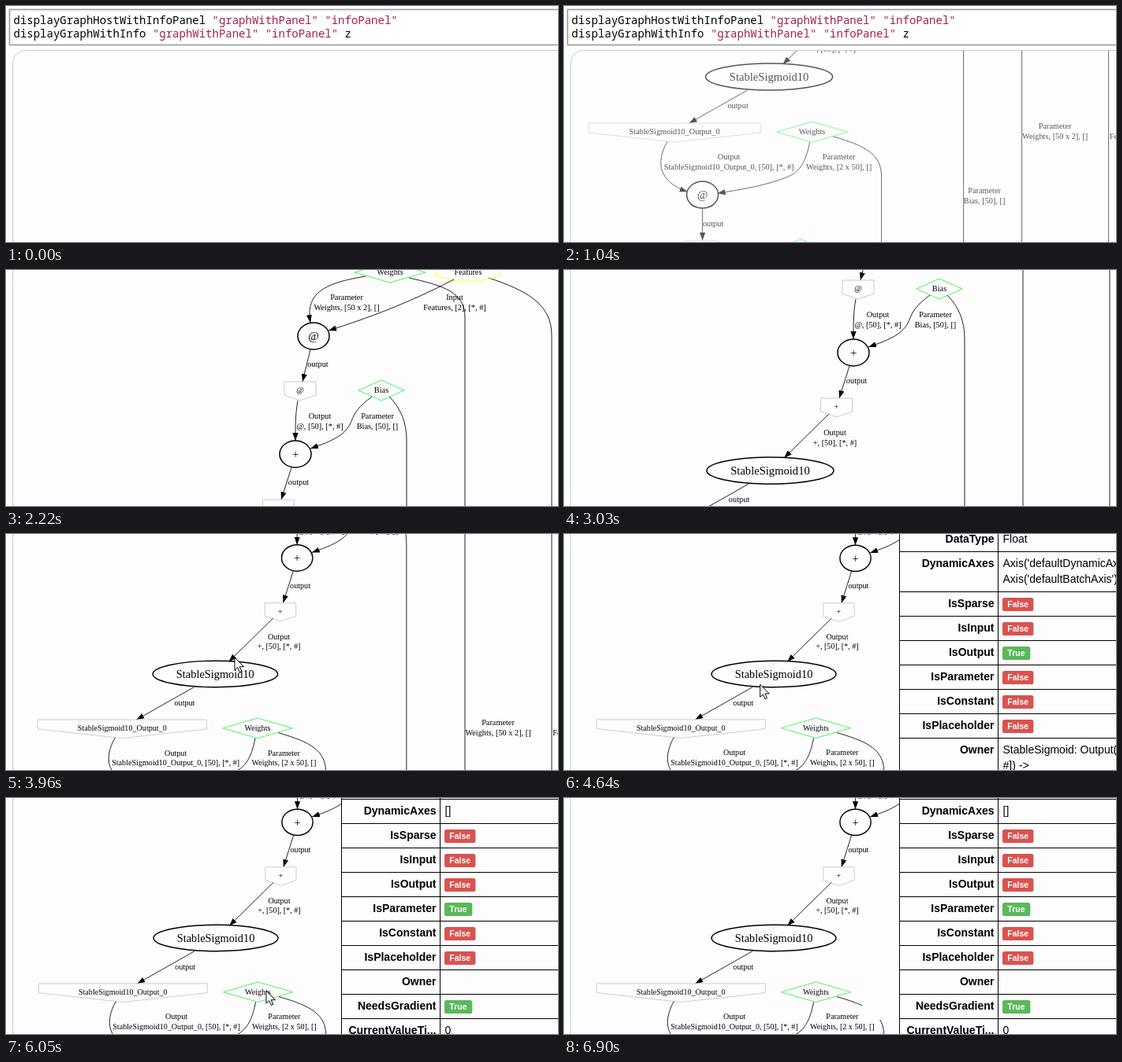
An HTML page for the animation above (7.3 s loop, 700 by 300 pixels).

```html
<!DOCTYPE html>
<html lang="en">
<head>
<meta charset="utf-8">
<title>Graph with info panel</title>
<style>
  html, body { margin: 0; width: 100%; height: 100%; overflow: hidden; background: #fff; }
  svg { display: block; }
  .code { font: 14px "Noto Sans Mono", monospace; }
  .str { fill: #a31f4c; }
  .graph { font: 10.3px "Liberation Serif", serif; text-anchor: middle; }
  .big { font-size: 14.6px; }
  .edge { fill: none; stroke: #222; }
  .arrow { marker-end: url(#head); }
  .op { fill: none; stroke: #000; stroke-width: 1.5; }
  .out { fill: none; stroke: #ccc; }
  .param { fill: none; stroke: #48f55c; }
  .input { fill: none; stroke: #ff3; }
  .table { font: 14px "Liberation Sans", sans-serif; }
  .table path { stroke: #000; fill: none; }
  .key { font-weight: bold; text-anchor: end; }
  .badge { font-weight: bold; font-size: 10.5px; fill: #fff; }
</style>
</head>
<body>
<svg width="700" height="300" viewBox="0 0 700 300">
  <defs>
    <marker id="head" markerUnits="userSpaceOnUse" markerWidth="11" markerHeight="8" refX="10" refY="4" orient="auto">
      <path d="M0,.4 L10,4 L0,7.6Z"/>
    </marker>
    <clipPath id="panelClip"><rect x="9" y="57" width="700" height="1500"/></clipPath>
  </defs>
  <g id="page">
    <rect x="4.5" y="4.5" width="720" height="45" fill="#fff" stroke="#999" stroke-width="1.6"/>
    <text class="code" x="9.5" y="23">displayGraphHostWithInfoPanel <tspan class="str">"graphWithPanel"</tspan> <tspan class="str">"infoPanel"</tspan></text>
    <text class="code" x="9.5" y="40">displayGraphWithInfo <tspan class="str">"graphWithPanel"</tspan> <tspan class="str">"infoPanel"</tspan> z</text>
    <rect x="8.5" y="56.5" width="720" height="1500" rx="16" fill="#fdfdfd" stroke="#a9d8de"/>
    <g clip-path="url(#panelClip)">
      <g id="graph" class="graph"><g id="outer"></g><g id="inner"></g></g>
    </g>
  </g>
  <rect id="gap" x="378" y="260" width="36" height="22" fill="#fdfdfd"/>
  <g id="outputTable" class="table"></g>
  <g id="weightsTable" class="table"></g>
  <path id="cursor" d="M0,0 V16 L3.7,12.6 L6.3,18.5 L8.8,17.4 L6.2,11.7 H11.5Z" fill="#fff" stroke="#000"/>
</svg>
<script>
const LOOP = 7300;
const $ = id => document.getElementById(id);

// Graph pieces, in page coordinates
const text = (x, y, s, cls = '') => `<text class="${cls}" x="${x}" y="${y + (cls ? 4.8 : 3.4)}">${s}</text>`;
const lines = (x, y, a, b) => text(x, y, a) + text(x, y + 12.5, b);
const poly = (cls, pts) => `<polygon class="${cls}" points="${pts}"/>`;
const op = (x, y, s, rx = 20) => `<ellipse class="op" cx="${x}" cy="${y}" rx="${rx}" ry="17"/>` + text(x, y, s, 'big');
const param = (x, y, s, w) => poly('param', [x - w, y, x, y - 13, x + w, y, x, y + 13]) + text(x, y, s);
const out = (x, y, s, w = 20) =>
  poly('out', [x - w, y - 11, x + w, y - 11, x + w, y + (w > 50 ? 1 : 6), x, y + 13, x - w, y + (w > 50 ? 1 : 6)]) + text(x, y, s);
const line = d => `<path class="edge" d="${d}"/>`;
const arrow = d => `<path class="edge arrow" d="${d}"/>`;

$('outer').innerHTML = [
  arrow('M511,79 C555,89 582,97 582,129 V860 C582,920 490,950 395,977'),
  arrow('M612,79 C660,95 692,112 692,152 V870 C692,935 520,965 398,983'),
  lines(624, 516, 'Parameter', 'Weights, [50 x 2], []'),
  lines(733, 516, 'Input', 'Features, [2], [*, #]'),
].join('');

$('inner').innerHTML = [
  param(487, 72, 'Weights', 45),
  poly('input', [546, 66, 571, 59, 601, 59, 626, 66, 626, 77, 601, 83, 571, 83, 546, 77]),
  text(586, 72, 'Features'),
  arrow('M456,77 C400,86 380,100 386,136'),
  arrow('M568,81 C515,109 460,130 409,146'),
  lines(432, 104, 'Parameter', 'Weights, [50 x 2], []'),
  lines(569, 104, 'Input', 'Features, [2], [*, #]'),
  op(390, 153, '@'),
  arrow('M386,170 L376,211'),
  text(395.5, 189, 'output'),
  out(373, 222, '@'),
  param(476, 222, 'Bias', 29),
  arrow('M370,235 C367,252 367,265 367,286'),
  arrow('M464,230 C430,255 446,262 424,279 C412,287 400,291 386,296'),
  arrow('M486,230 C500,244 508,262 508,285 V860 C508,920 440,950 385,974'),
  lines(398, 255, 'Output', '@, [50], [*, #]'),
  lines(471, 255, 'Parameter', 'Bias, [50], []'),
  op(367, 303, '+'),
  arrow('M362,320 L349,361'),
  text(371, 339, 'output'),
  out(345.5, 372, '+'),
  arrow('M336,381 L279,437'),
  lines(343.5, 405, 'Output', '+, [50], [*, #]'),
  op(261.5, 453, 'StableSigmoid10', 80.5),
  arrow('M234,470 L160,512'),
  text(222, 490, 'output'),
  out(141.5, 523, 'StableSigmoid10_Output_0', 109),
  param(316, 523, 'Weights', 45),
  arrow('M132.5,535 C117,562 122,587 158,599'),
  arrow('M313,536 C308,562 300,574 285,580 C265,589 230,596 196,601'),
  arrow('M343,529 C385,541 404,552 404,580 V880 C404,920 375,950 355,969'),
  lines(210.5, 555, 'Output', 'StableSigmoid10_Output_0, [50], [*, #]'),
  lines(350, 555, 'Parameter', 'Weights, [2 x 50], []'),
  lines(534.5, 598, 'Parameter', 'Bias, [50], []'),
  op(177, 603, '@'),
  arrow('M177,620 V661'),
  text(190.5, 640, 'output'),
  out(177, 672, '@'),
  param(301.5, 672, 'Bias', 29),
  arrow('M175,685 L165,736'),
  arrow('M288,680 C265,705 230,730 182,746'),
  lines(190, 705, 'Output', '@, [2], [*, #]'),
  lines(275, 705, 'Parameter', 'Bias, [2], []'),
  op(163, 753, '+'),
  arrow('M160,770 L152,811'),
  text(173, 789, 'output'),
  out(150, 822, '+'),
  arrow('M152,835 C160,890 220,940 290,972'),
  lines(190, 870, 'Output', '+, [2], [*, #]'),
  op(330, 985, 'Composite', 70),
  arrow('M285,998 L160,1049'),
  out(118, 1060, 'Composite_Output_0', 109),
].join('');

// Info tables: each row is a label and one or more value lines
function table(top, rows) {
  let y = top, body = '', rules = `M425,${y}H700`;
  for (const [key, ...values] of rows) {
    body += `<text class="key" x="545.5" y="${y + 19.5}">${key}</text>`;
    values.forEach((value, i) => {
      if (value === 'True' || value === 'False') {
        const on = value === 'True';
        body += `<rect x="556" y="${y + 7.5}" width="${on ? 35.3 : 39.4}" height="17" rx="2.6" fill="${on ? '#5cb85c' : '#d9534f'}"/>
          <text class="badge" x="562.3" y="${y + 19.8}">${value}</text>`;
      } else {
        body += `<text x="556.5" y="${y + 19.5 + i * 20}">${value}</text>`;
      }
    });
    y += 11 + 20 * values.length;
    rules += `M425,${y}H700`;
  }
  return `<rect x="425" width="275" height="300" fill="#fdfdfd"/>${body}<path d="${rules}M425.5,0V300M550.5,0V300"/>`;
}
const flags = (...on) => ['IsSparse', 'IsInput', 'IsOutput', 'IsParameter', 'IsConstant', 'IsPlaceholder']
  .map(name => [name, on.includes(name) ? 'True' : 'False']);

$('outputTable').innerHTML = table(-8.5, [
  ['DataType', 'Float'],
  ['DynamicAxes', "Axis('defaultDynamicAxis'),", "Axis('defaultBatchAxis')"],
  ...flags('IsOutput'),
  ['Owner', 'StableSigmoid: Output([50], [*,', '#]) -&gt;'],
]);
$('weightsTable').innerHTML = table(1.5, [
  ['DynamicAxes', '[]'],
  ...flags('IsParameter'),
  ['Owner', ''],
  ['NeedsGradient', 'True'],
  ['CurrentValueTi...', '0'],
]);

// The picture only changes at these moments (ms)
const ticks = [0, 590, 740, 900, 1040, 1160, 1280, 1430, 1950, 2100, 2220, 2340, 2460, 2610, 2730, 2880,
  3030, 3150, 3270, 3420, 3540, 3670, 3810, 3960, 4080, 4220, 4370, 4500, 4640, 4760, 4880, 5030, 5150,
  5270, 5420, 5540, 5690, 5810, 5930, 6050, 6200, 6320, 6440, 6600];

// Linear interpolation through [time, ...values] keys
function track(keys, t) {
  if (t <= keys[0][0]) return keys[0].slice(1);
  const i = keys.findIndex(k => k[0] > t);
  if (i < 0) return keys.at(-1).slice(1);
  const a = keys[i - 1], b = keys[i], u = (t - a[0]) / (b[0] - a[0]);
  return a.slice(1).map((v, n) => v + (b[n + 1] - v) * u);
}
const scrollKeys = [[1800, 0], [2220, 69], [2730, 138], [3030, 198], [3420, 275]];
const enterKeys = [[387, 0], [1387, 1]];
const zoomKeys = [[3400, 1], [4060, 0.981]];
const cursorKeys = [[4500, 290, 157], [4880, 178, 250], [5030, 153, 273], [5270, 153, 273], [5540, 188, 266],
  [6050, 330, 245], [6440, 400, 265]];

const show = (id, on) => $(id).setAttribute('visibility', on ? 'visible' : 'hidden');
const move = (id, value) => $(id).setAttribute('transform', value);

function draw(now) {
  const t = ticks.findLast(tick => tick <= now % LOOP);
  const [enter] = track(enterKeys, t), [zoom] = track(zoomKeys, t);
  move('page', `translate(0 ${-track(scrollKeys, t)[0]})`);
  move('graph', `translate(${-4 * (1 - enter)} ${-1046 * (1 - enter)})`);
  $('graph').setAttribute('opacity', enter);
  move('inner', `translate(500 453) scale(${zoom}) translate(-500 -453)`);
  move('outer', `translate(0 453) scale(1 ${zoom}) translate(0 -453)`);
  move('cursor', `translate(${track(cursorKeys, t).join(' ')})`);
  show('graph', t >= 590);
  show('cursor', t >= 3670 && t < 6600);
  show('gap', t >= 6600);
  show('outputTable', t >= 4640 && t < 6050);
  show('weightsTable', t >= 6050);
}

const start = performance.now();
function loop() {
  draw(performance.now() - start);
  requestAnimationFrame(loop);
}
loop();
</script>
</body>
</html>
```
